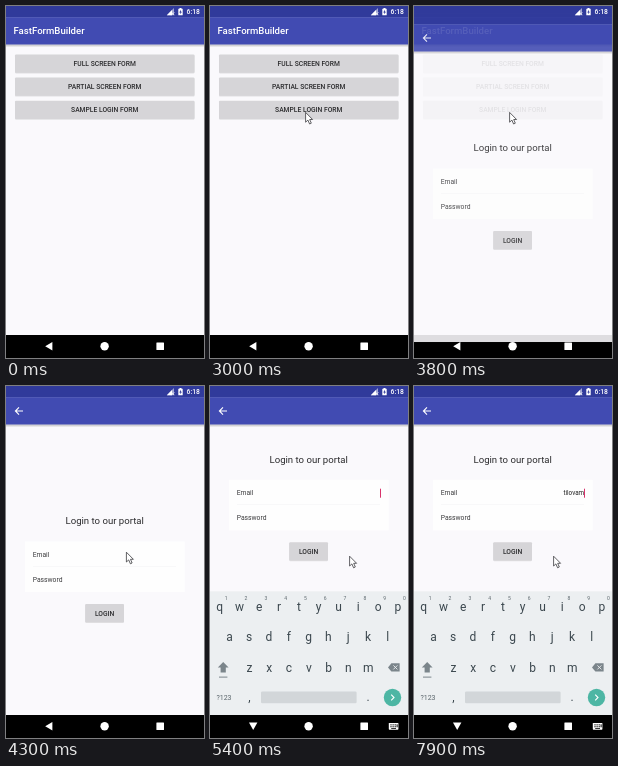
Write an HTML page that moves like this. It is 198x352 px and loops after 8000 ms.

```html
<!DOCTYPE html>
<html lang="en">
<head>
<meta charset="utf-8">
<title>Login form demo</title>
<style>
html, body { margin: 0; width: 100%; height: 100%; overflow: hidden; background: #000; }
svg { display: block; width: 100vw; height: 100vh; font-family: Roboto, sans-serif; }
.medium { font-weight: 500; }
.mid { text-anchor: middle; }
.end { text-anchor: end; }
</style>
</head>
<body>
<svg id="stage" viewBox="0 0 198 352"></svg>
<script>
const LOOP = 8000, STEP = 100;
const BAR = '#414bb2', STATUS = '#303a9b', PAGE = '#faf9fc', BUTTON = '#d6d5d8';
const INK = '#2b2b2d', KEY = '#3b474e', KEY_ICON = '#7b858b';

const rect = (x, y, w, h, fill, more = '') =>
  `<rect x="${x}" y="${y}" width="${w}" height="${h}" fill="${fill}" ${more}/>`;
const path = (d, fill, more = '') => `<path d="${d}" fill="${fill}" ${more}/>`;
const text = (str, x, y, size, fill, cls = '', more = '') =>
  `<text x="${x}" y="${y}" font-size="${size}" fill="${fill}" class="${cls}" ${more}>${str}</text>`;

function button(label, x, cy, w, id = '') {
  return rect(x, cy - 8.6, w, 18.4, '#000', 'rx="1.2" opacity=".1"') +
    rect(x, cy - 9.2, w, 18.2, BUTTON, `rx="1" ${id && `id="${id}"`}`) +
    text(label, x + w / 2, cy + 2.5, 6.74, INK, 'medium mid');
}

// Page background, status strip and toolbar shared by both screens
const frame = () =>
  rect(0, 0, 198, 329, PAGE) +
  rect(0, 38.4, 198, 3, 'url(#shade)') +
  rect(0, 0, 198, 11.5, STATUS) +
  rect(0, 11.2, 198, 27.3, BAR);

function menuScreen() {
  const labels = ['FULL SCREEN FORM', 'PARTIAL SCREEN FORM', 'SAMPLE LOGIN FORM'];
  return frame() +
    text('FastFormBuilder', 7.5, 28.4, 9.6, '#fff', 'medium') +
    labels.map((s, i) => button(s, 9, 57.7 + 23.1 * i, 179.5, 'menu' + i)).join('');
}

function loginScreen() {
  return frame() +
    path('M13 21.4L9.4 25L13 28.6M9.6 25H17', 'none', 'stroke="#fff" stroke-width="1.1"') +
    '<g id="form">' +
    text('Login to our portal', 98.7, 138.4, 9.6, INK, 'mid') +
    rect(19, 155.6, 159.8, 50.4, '#fefefe') +
    rect(27, 180.2, 143, .5, '#f1f0f2') +
    text('Email', 26.7, 171, 6.74, '#3c3c3e') +
    text('Password', 26.7, 195.8, 6.74, '#3c3c3e') +
    text('', 170.1, 171, 6.3, '#222', 'end', 'id="typed"') +
    rect(170, 164.4, 1, 9, '#d8346c', 'id="caret"') +
    button('LOGIN', 79.2, 227.2, 38.8) +
    '</g>';
}

function keyRow(keys, x, y) {
  return [...keys].map((k, i) => text(k, x + 19.8 * i, y, 12, KEY, 'mid')).join('');
}

function keyboard() {
  return rect(0, 205.4, 198, 123.6, '#eceff1') +
    keyRow('qwertyuiop', 9.7, 225) +
    [...'1234567890'].map((n, i) => text(n, 16.2 + 19.8 * i, 214, 5, '#5b666c', 'mid')).join('') +
    keyRow('asdfghjkl', 19.4, 255.4) +
    keyRow('zxcvbnm', 39.4, 285.6) +
    path('M13.2 276L18.6 281.6H15.8V286.4H10.6V281.6H7.8Z', KEY_ICON) +
    rect(9, 290.6, 8.4, 1, KEY_ICON) +
    path('M178 281.4L181.4 277.2H189.6V285.6H181.4Z', KEY_ICON) +
    path('M183.4 279.4L187.4 283.4M187.4 279.4L183.4 283.4', 'none', 'stroke="#eceff1" stroke-width=".9"') +
    text('?123', 14, 314, 7, '#5b666c', 'mid') +
    text(',', 39.4, 315, 12, KEY, 'mid') +
    rect(51, 305.6, 95.6, 11.6, '#d2d6d9', 'rx="1.2"') +
    text('.', 158, 315, 12, KEY, 'mid') +
    '<circle cx="182.5" cy="311.5" r="8.7" fill="#4db6a4"/>' +
    path('M181.2 308.7L184 311.5L181.2 314.3', 'none', 'stroke="#fff" stroke-width="1.1"');
}

function statusIcons() {
  return path('M168 2V9.2H160.8Z', '#fff', 'opacity=".55"') +
    path('M166 4V9.2H160.8Z', '#fff') +
    path('M165.4 6.2L168.4 9.2M168.4 6.2L165.4 9.2', 'none', 'stroke="#fff" stroke-width=".7"') +
    rect(172.3, 2.7, 4.4, 6.6, '#fff', 'rx=".4"') + rect(173.5, 2, 2, 1, '#fff') +
    path('M174.9 3.8L173.2 6.4H174.3V8.3L175.9 5.7H174.9Z', STATUS) +
    text('6:18', 194, 8.2, 6.8, '#fff', 'medium end');
}

function navBar() {
  const dots = [0, 1, 2].map(i =>
    rect(180.4 + 2.1 * i, 338.3, 1.2, 1.1, '#000') + rect(180.4 + 2.1 * i, 340.2, 1.2, 1.1, '#000')).join('');
  return path('M39.2 340.2L46.4 336V344.4Z', '#fff', 'id="back"') +
    path('M39 336.6H47.4L43.2 344Z', '#fff', 'id="down"') +
    '<circle cx="98.6" cy="340.2" r="4.2" fill="#fff"/>' +
    rect(150.4, 336.5, 7.6, 7.4, '#fff', 'rx=".5"') +
    '<g id="imeIcon">' + rect(178.8, 337, 9.6, 6.7, '#fff', 'rx=".6"') + dots +
    rect(186.6, 338.3, 1, 3, '#000') + rect(181.2, 342.1, 4.8, .8, '#000') + '</g>';
}

document.getElementById('stage').innerHTML =
  `<defs><linearGradient id="shade" x2="0" y2="1">
    <stop stop-color="#000" stop-opacity=".25"/><stop offset="1" stop-color="#000" stop-opacity="0"/>
  </linearGradient></defs>` +
  rect(0, 0, 198, 352, '#000') +
  `<g id="menu">${menuScreen()}</g><g id="login">${loginScreen()}</g><g id="keys">${keyboard()}</g>` +
  statusIcons() + navBar() +
  path('M0 0V9.8L2.3 7.7L4 11.6L5.7 10.8L4.1 7.1H7Z', '#fff',
    'id="mouse" stroke="#3a3a3e" stroke-width=".8" stroke-linejoin="round"');

const $ = id => document.getElementById(id);
const show = (id, on) => $(id).setAttribute('visibility', on ? 'visible' : 'hidden');
const move = (id, x, y) => $(id).setAttribute('transform', `translate(${x} ${y})`);
const fade = (id, a) => $(id).setAttribute('opacity', a);
const ramp = (t, start, span) => Math.min(1, Math.max(0, (t - start) / span));
const easeOut = (p, power) => 1 - (1 - p) ** power;

// time, x, y of the pointer tip
const TRAIL = [
  [2800, 103, 104], [3000, 95.6, 106.4], [3800, 95.6, 106.4], [4300, 120.4, 166.2],
  [4500, 136.6, 164.4], [4600, 136.6, 164.4], [4700, 139.6, 170.2]
];
const TYPED = 'tilovam';
const KEY_TIMES = [6600, 6800, 7000, 7200, 7400, 7600, 7900];

function pointer(t) {
  const i = TRAIL.findIndex(k => k[0] > t);
  if (i < 0) return TRAIL[TRAIL.length - 1].slice(1);
  if (i === 0) return TRAIL[0].slice(1);
  const [t0, x0, y0] = TRAIL[i - 1], [t1, x1, y1] = TRAIL[i];
  const p = (t - t0) / (t1 - t0);
  return [x0 + (x1 - x0) * p, y0 + (y1 - y0) * p];
}

function draw(ms) {
  const t = Math.floor(ms / STEP) * STEP;

  const press = ramp(t, 3200, 300);
  const shade = (from, to) => Math.round(from + (to - from) * press);
  $('menu2').setAttribute('fill', `rgb(${shade(214, 202)},${shade(213, 202)},${shade(216, 203)})`);

  // New screen fades in while rising by 8% of the height
  const opened = 3715;
  show('login', t >= opened);
  fade('login', easeOut(ramp(t, opened, 200), 4));
  move('login', 0, 28.2 * (1 - easeOut(ramp(t, opened, 350), 5)));

  // Keyboard opens and the form centres in what is left
  const ime = easeOut(ramp(t, 5220, 180), 2);
  const raised = t >= 5300;
  show('keys', raised);
  fade('keys', ime);
  move('keys', 0, 12.4 * (1 - ime));
  move('form', 0, raised ? -61.7 : 0);

  const focused = t >= 5000;
  show('back', !focused);
  show('down', focused);
  show('imeIcon', focused);

  show('caret', (t >= 5300 && t < 5600) || t >= 6000);
  $('typed').textContent = TYPED.slice(0, KEY_TIMES.filter(k => k <= t).length);

  show('mouse', t >= TRAIL[0][0]);
  move('mouse', ...pointer(t));
}

const begin = performance.now();
function tick() {
  draw((performance.now() - begin) % LOOP);
  requestAnimationFrame(tick);
}
tick();
</script>
</body>
</html>
```
